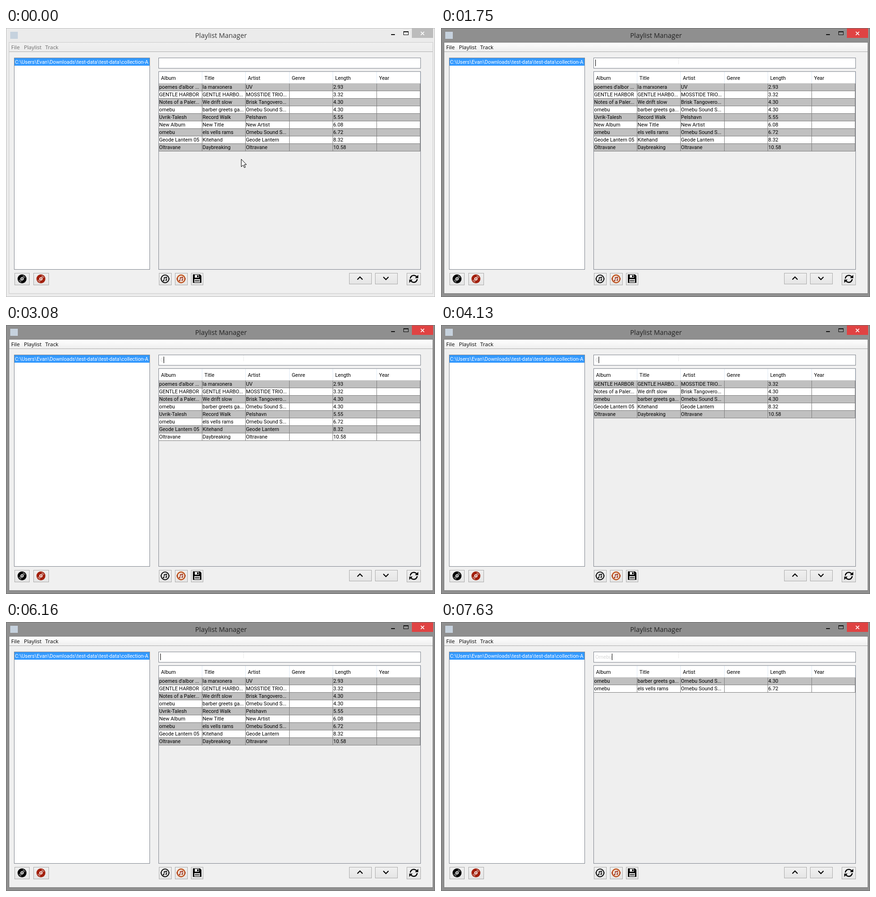
Animation, 909 px wide and 571 px high, one loop 8000 ms. Source, as an HTML page with a canvas:

```html
<!DOCTYPE html>
<html lang="en">
<head>
<meta charset="utf-8">
<title>Playlist Manager</title>
<style>
  html, body { margin: 0; width: 100%; height: 100%; overflow: hidden; background: #ebebeb; }
  canvas { display: block; width: 909px; height: 571px; }
</style>
</head>
<body>
<canvas id="stage" width="909" height="571"></canvas>
<script>
const ctx = document.getElementById('stage').getContext('2d');
const LOOP = 8000, TICK = 70;
const SMALL = '10.8px Roboto, sans-serif';
const MENU = '11.5px "Open Sans", sans-serif';
const TITLE = '14.3px "Open Sans", sans-serif';

const COLS = [324, 416, 508, 601, 693, 786, 878];
const HEADS = ['Album', 'Title', 'Artist', 'Genre', 'Length', 'Year'];
const TRACKS = [
  ["poemes d'albor ...", 'la marxonera', 'UV', '2.93'],
  ['GENTLE HARBOR', 'GENTLE HARBO...', 'MOSSTIDE TRIO...', '3.32'],
  ['Notes of a Paler...', 'We drift slow', 'Brisk Tangovero...', '4.30'],
  ['ornebu', 'barber greets ga...', 'Ornebu Sound S...', '4.30'],
  ['Uvrik-Talesh', 'Record Walk', 'Pelshavn', '5.55'],
  ['New Album', 'New Title', 'New Artist', '6.08'],
  ['ornebu', 'els vells rams', 'Ornebu Sound S...', '6.72'],
  ['Geode Lantern 05', 'Kitehand', 'Geode Lantern', '8.32'],
  ['Oltravane', 'Daybreaking', 'Oltravane', '10.58']
];

// [start time, search text, caret visible]
const TYPING = [
  [0, '', 0], [770, '', 1], [1260, '', 0], [1750, '', 1],
  [2030, 'O', 1], [2170, 'Ol', 1], [2240, 'Olt', 1], [2380, 'Oltr', 1],
  [2800, 'Olt', 1], [2940, 'Ol', 1], [3080, 'O', 1], [3220, '', 1],
  [3640, '', 0], [4130, 'G', 1], [4270, 'Ge', 1], [4410, 'Geo', 1],
  [4830, 'Geo', 0], [4970, 'Ge', 1], [5110, 'G', 1], [5250, '', 1],
  [5740, '', 0], [6160, '', 1], [6510, 'O', 1], [6860, 'Or', 1],
  [7210, 'Orn', 1], [7280, 'Orne', 1], [7560, 'Orneb', 1], [7630, 'Ornebu', 1]
];

const clamp = v => Math.max(0, Math.min(1, v));
const ease = v => v * v * (3 - 2 * v);

function mix(a, b, p) {
  return `rgb(${a.map((v, i) => Math.round(v + (b[i] - v) * p)).join(',')})`;
}
const grey = (a, b, p) => mix([a, a, a], [b, b, b], p);

function fill(color, x, y, w, h) {
  ctx.fillStyle = color;
  ctx.fillRect(x, y, w, h);
}

function box(x, y, w, h, border, color) {
  fill(border, x, y, w, h);
  fill(color, x + 1, y + 1, w - 2, h - 2);
}

function text(str, x, y, font, color, align = 'left') {
  ctx.font = font;
  ctx.fillStyle = color;
  ctx.textAlign = align;
  ctx.fillText(str, x, y);
}

function line(color, width, ...pts) {
  ctx.strokeStyle = color;
  ctx.lineWidth = width;
  ctx.beginPath();
  for (let i = 0; i < pts.length; i += 2) ctx.lineTo(pts[i], pts[i + 1]);
  ctx.stroke();
}

function arc(color, width, x, y, r, from = 0, to = Math.PI * 2) {
  ctx.strokeStyle = color;
  ctx.lineWidth = width;
  ctx.beginPath();
  ctx.arc(x, y, r, from, to);
  ctx.stroke();
}

function dot(color, x, y, r) {
  ctx.fillStyle = color;
  ctx.beginPath();
  ctx.arc(x, y, r, 0, Math.PI * 2);
  ctx.fill();
}

function shape(color, ...pts) {
  ctx.fillStyle = color;
  ctx.beginPath();
  for (let i = 0; i < pts.length; i += 2) ctx.lineTo(pts[i], pts[i + 1]);
  ctx.fill();
}

function button(x, w, h) {
  const g = ctx.createLinearGradient(0, 520, 0, 520 + h);
  g.addColorStop(0, '#f0f0f0');
  g.addColorStop(1, '#e5e5e5');
  box(x, 520, w, h, '#acacac', g);
}

function disc(x, y, color) {
  dot(color, x, y, 9.5);
  for (const r of [5, 7.2]) {
    arc('#e8e8e8', 0.9, x, y, r, -1.35, -0.35);
    arc('#e8e8e8', 0.9, x, y, r, 1.8, 2.8);
  }
  dot('#fff', x, y, 3.3);
  dot(color, x, y, 1.4);
}

function note(x, y, ring, glow) {
  if (glow) arc(glow, 3.4, x, y, 8);
  arc(ring, glow ? 1.5 : 2, x, y, 8.2);
  shape(ring, x - 10, y, x - 7.5, y - 3, x - 7.5, y + 3);
  shape(ring, x + 10, y, x + 7.5, y - 3, x + 7.5, y + 3);
  line(ring, 1.2, x - 2, y + 3.5, x - 2, y - 3, x + 3.5, y - 4, x + 3.5, y + 2.5);
  line(ring, 1.2, x - 2, y - 1.4, x + 3.5, y - 2.4);
  dot(ring, x - 3.2, y + 3.6, 1.6);
  dot(ring, x + 2.3, y + 2.6, 1.6);
}

function floppy(x, y) {
  shape('#000', x, y, x + 15, y, x + 18, y + 3, x + 18, y + 18, x, y + 18);
  fill('#eee', x + 4, y + 1, 9, 6);
  fill('#000', x + 9, y + 2, 3, 4);
  fill('#eee', x + 3, y + 10, 12, 7);
  fill('#000', x + 4, y + 12, 10, 1);
  fill('#000', x + 4, y + 14, 10, 1);
}

function refresh(x, y) {
  arc('#000', 2.4, x, y, 7.4, Math.PI * 1.03, Math.PI * 1.82);
  arc('#000', 2.4, x, y, 7.4, Math.PI * 0.03, Math.PI * 0.82);
  shape('#000', x + 9.5, y - 8.5, x + 9.5, y - 1.5, x + 2.5, y - 1.5);
  shape('#000', x - 9.5, y + 8.5, x - 9.5, y + 1.5, x - 2.5, y + 1.5);
}

// p: 0 = inactive window, 1 = focused window
function drawFrame(p) {
  box(0, 0, 909, 571, grey(190, 112, p), grey(235, 143, p));
  box(6, 30, 899, 534, grey(205, 128, p), '#f0f0f0');

  const bar = ctx.createLinearGradient(0, 31, 0, 50);
  bar.addColorStop(0, grey(240, 255, p));
  bar.addColorStop(1, grey(236, 238, p));
  fill(bar, 7, 31, 897, 19);
  fill('#a8a8a8', 7, 50, 897, 1);
  fill('#fafafa', 7, 51, 897, 1);

  fill('#c6d2de', 9, 8, 16, 15);
  text('Playlist Manager', 455.5, 21, TITLE, grey(56, 34, p), 'center');

  fill('#111', 816, 13, 8, 2);
  fill('#111', 842, 7, 11, 8);
  fill(grey(235, 143, p), 843, 9, 9, 5);
  fill(mix([188, 188, 188], [224, 67, 67], p), 860, 1, 45, 20);
  line('#fff', 1.7, 879, 8, 886, 15);
  line('#fff', 1.7, 886, 8, 879, 15);

  const ink = grey(109, 0, p);
  text('File', 11, 45, MENU, ink);
  text('Playlist', 38, 45, MENU, ink);
  text('Track', 83, 45, MENU, ink);
}

function drawList() {
  box(17, 63, 288, 450, '#828790', '#fff');
  fill('#3399ff', 18, 64, 286, 16);
  text('C:\\Users\\Evan\\Downloads\\test-data\\test-data\\collection-A', 19, 76, SMALL, '#fff');
}

function drawTable(query) {
  box(323, 92, 556, 421, '#828790', '#efefef');
  fill('#fff', 324, 93, 554, 25);
  fill('#d5d5d5', 324, 117, 554, 1);
  HEADS.forEach((head, i) => {
    fill('#dfeaf5', COLS[i + 1] - 1, 93, 1, 24);
    text(head, COLS[i] + 4.5, 110, SMALL, '#000');
  });

  const q = query.toLowerCase();
  const rows = TRACKS.filter(r => r.join('\n').toLowerCase().includes(q));
  rows.forEach(([album, title, artist, length], i) => {
    const y = 118 + i * 16;
    fill(i % 2 ? '#fff' : '#c0c0c0', 324, y, 554, 15);
    fill('#808080', 324, y + 15, 554, 1);
    [album, title, artist, '', length].forEach((cell, c) =>
      text(cell, COLS[c] + 0.5, y + 11, SMALL, '#000'));
    COLS.slice(1).forEach(x => fill('#808080', x - 1, y, 1, 16));
  });
}

function drawField(query, caret) {
  box(323, 63, 556, 23, '#828790', '#fff');
  text(query, 327, 78, SMALL, '#d8d8d8');
  if (caret) fill('#000', Math.round(327 + ctx.measureText(query).width), 67, 1, 14);
}

function drawButtons() {
  button(18, 32, 26);
  button(58, 33, 26);
  button(324, 27, 26);
  button(358, 27, 26);
  button(392, 26, 26);
  button(727, 48, 24);
  button(782, 48, 24);
  button(849, 30, 26);
  disc(34, 532.5, '#000');
  disc(74, 532.5, '#a3200c');
  note(337, 532.5, '#111');
  note(371, 532.5, '#a3321a', '#f0b070');
  floppy(396, 523);
  line('#000', 2, 744.5, 534, 750, 528.5, 755.5, 534);
  line('#000', 2, 799.5, 528.5, 805, 534, 810.5, 528.5);
  refresh(864, 532.5);
}

function drawPointer(t) {
  const p = ease(clamp((t - TICK) / 490));
  const x = 498 + 5 * p, y = 278 - 208 * p;
  if (y < 86) {
    fill('#ececec', 503, 64, 1, 13);
    return;
  }
  ctx.save();
  ctx.translate(Math.round(x) + 0.5, Math.round(y) + 0.5);
  ctx.beginPath();
  for (const [px, py] of [[0, 0], [0, 16], [4, 12.5], [6.5, 18], [8.8, 17], [6.4, 11.5], [11, 11.5]]) {
    ctx.lineTo(px, py);
  }
  ctx.closePath();
  ctx.fillStyle = '#fff';
  ctx.fill();
  ctx.strokeStyle = '#000';
  ctx.lineWidth = 1;
  ctx.stroke();
  ctx.restore();
}

function draw(now) {
  const t = now % LOOP;
  const step = Math.floor(t / TICK) * TICK;
  const [, query, caret] = TYPING.filter(s => s[0] <= t).pop();
  drawFrame(clamp((step - 560) / 280));
  drawList();
  drawTable(query);
  drawField(query, caret);
  drawButtons();
  drawPointer(step);
}

const start = performance.now();
function loop() {
  draw(performance.now() - start);
  requestAnimationFrame(loop);
}
loop();
</script>
</body>
</html>
```
